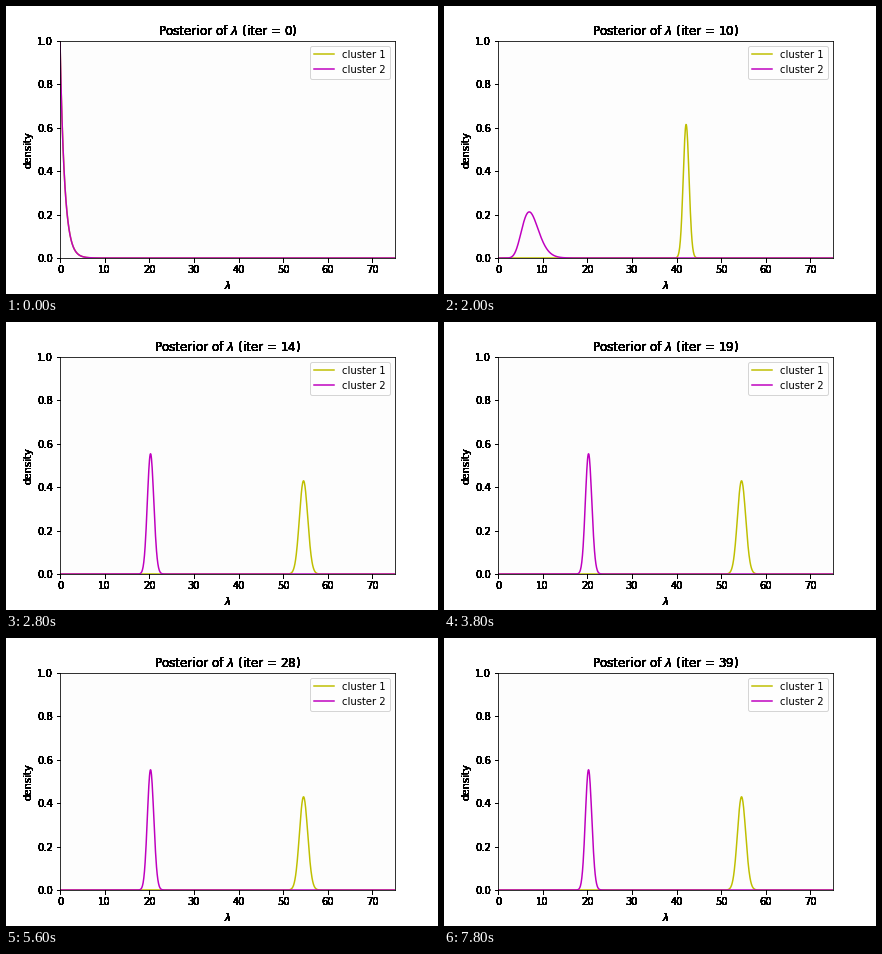
Write a matplotlib script that moves like this. It is 432 px wide and 288 px high and loops after 8 s.

```python
from math import lgamma, log

import matplotlib.pyplot as plt
import numpy as np
from matplotlib.animation import FuncAnimation
from matplotlib.axes import Axes

ITERS = 40
TOTAL_SHAPE, TOTAL_RATE = 4230, 102   # shared between the two clusters
INK_PASSES = 14

# Gamma (shape, rate) of cluster 2 while the sampler splits the data
SPLIT = {10: (15, 2), 11: (76, 6), 12: (342, 20), 13: (755, 37.5)}
SETTLED = (792, 39)
SWAPPED = (825, 40)                   # one borderline point changes sides
SWAP_ITERS = (17, 23, 26)


class InkAxes(Axes):
    """Axes whose outer text is drawn repeatedly for hard, dark edges."""

    def draw(self, renderer):
        super().draw(renderer)
        for _ in range(INK_PASSES):
            for part in (self.xaxis, self.yaxis, self.title):
                part.draw(renderer)


def gamma_pdf(x, shape, rate):
    log_pdf = (shape * log(rate) - lgamma(shape)
               + (shape - 1) * np.log(x) - rate * x)
    return np.exp(log_pdf)


def posteriors(i):
    if i == 0:
        return (1, 1), (1, 1)
    if i < min(SPLIT):
        second = (1, 1)
    elif i in SPLIT:
        second = SPLIT[i]
    else:
        second = SWAPPED if i in SWAP_ITERS else SETTLED
    return (TOTAL_SHAPE - second[0], TOTAL_RATE - second[1]), second


fig = plt.figure(figsize=(6, 4), dpi=72, facecolor="white")
ax = InkAxes(fig, [0.125, 0.125, 0.775, 0.755], facecolor="#fdfdfd")
fig.add_axes(ax)

x = np.linspace(1e-9, 75, 1000)
lines = [ax.plot(x, 0 * x, color=c, label=f"cluster {k}")[0]
         for k, c in ((1, "y"), (2, "m"))]
ax.set(xlim=(0, 75), ylim=(0, 1), xlabel=r"$\lambda$", ylabel="density")
ax.legend(loc="upper right")


def update(i):
    for line, params in zip(lines, posteriors(i)):
        line.set_ydata(gamma_pdf(x, *params))
    ax.set_title(rf"Posterior of $\lambda$ (iter = {i})")
    return lines


anim = FuncAnimation(fig, update, frames=ITERS, interval=200,
                     repeat=True, repeat_delay=0, blit=False)
plt.show()
```
